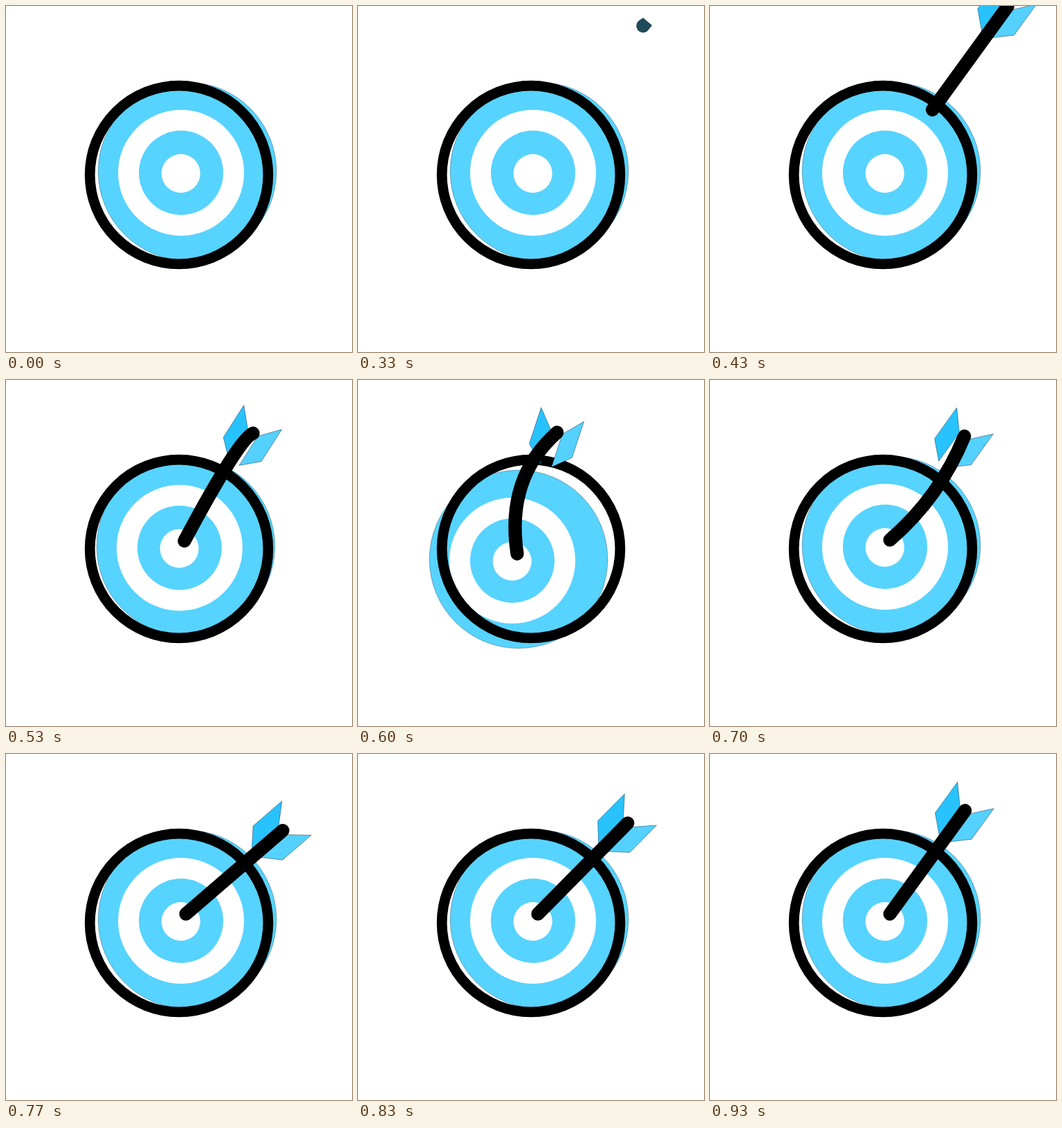
Animation of 500x500 px, one loop 1.31 s. Source, as an HTML page:

```html
<!DOCTYPE html>
<html lang="en">
<head>
<meta charset="utf-8">
<title>Target and arrow</title>
<style>
  html, body { margin: 0; width: 100%; height: 100%; overflow: hidden; background: #fff; }
  svg { display: block; width: 100%; height: 100%; }
</style>
</head>
<body>
<svg viewBox="0 0 500 500">
  <g id="disc">
    <circle cx="262" cy="239" r="128.8" fill="#57d3ff" stroke="#123" stroke-opacity=".5" stroke-width=".7"/>
    <circle cx="253" cy="241" r="91" fill="#fff"/>
    <circle cx="253" cy="241" r="61" fill="#57d3ff"/>
    <circle cx="252.7" cy="242" r="28" fill="#fff"/>
  </g>
  <circle cx="250" cy="244" r="128.8" fill="none" stroke="#000" stroke-width="14.8"/>
  <path id="bud" fill="#1f4a5c" d="M412 17L425 28L418 36.500A9.500 9.500 0 1 1 406 21Z"/>
  <g id="arrow">
    <g id="fletch" stroke="#123" stroke-opacity=".6" stroke-width=".7">
      <path fill="#28c3fe" d="M-33-27L-33 28L-9 51L-9 0Z"/>
      <path fill="#55d1ff" d="M32-27L32 28L8 50L8 0Z"/>
    </g>
    <path id="shaft" fill="none" stroke="#000" stroke-width="19.300" stroke-linecap="round"/>
  </g>
</svg>
<script>
const LOOP = 1310, STEP = 100 / 3, LENGTH = 184.6;
const LAUNCH = 333, IMPACT = 500;
const START = { x: 414, y: 28 }, HIT = { x: 260, y: 231.1 };

// Key poses as [time, value], eased in between
const ANGLE = [[507, 36], [600, 18.2], [790, 50.6], [900, 33.3], [933, 36]];
const PUSH = [[520, 0], [600, 1], [700, 0]];
const BEND = [[500, 0], [600, -50], [667, 30], [767, 0]];
const CREST = [[500, 1], [620, .5]];

const el = id => document.getElementById(id);
const disc = el('disc'), bud = el('bud'), arrow = el('arrow');
const fletch = el('fletch'), shaft = el('shaft');
const clamp = x => Math.max(0, Math.min(1, x));
const mix = (a, b, x) => a + (b - a) * x;
const smooth = x => x * x * (3 - 2 * x);
const show = (node, on) => node.setAttribute('visibility', on ? 'visible' : 'hidden');

function track(keys, t) {
  let value = keys[0][1];
  for (let i = 1; i < keys.length; i++) {
    const [t0, a] = keys[i - 1], [t1, b] = keys[i];
    if (t >= t0) value = mix(a, b, smooth(clamp((t - t0) / (t1 - t0))));
  }
  return value;
}

// Hold time to 30 steps a second, each starting on a whole 10 ms
function stepTime(t) {
  let k = Math.floor(t / STEP) + 1;
  while (Math.round(k * STEP / 10) * 10 > t) k--;
  return k * STEP;
}

function draw(now) {
  const t = stepTime(now);
  const flown = clamp((t - LAUNCH) / (IMPACT - LAUNCH));
  const size = Math.min(1, flown * 2);
  const push = track(PUSH, t), dx = -30 * push, dy = 20 * push;
  const x = mix(START.x, HIT.x, flown) + dx;
  const y = mix(START.y, HIT.y, flown) + dy;
  const len = LENGTH * size;

  show(bud, t > LAUNCH && flown < .1);
  show(arrow, flown >= .1);
  disc.setAttribute('transform', `translate(${dx} ${dy})`);
  arrow.setAttribute('transform', `translate(${x} ${y}) rotate(${track(ANGLE, t)})`);
  fletch.setAttribute('transform', `translate(0 ${-len}) scale(${size})`);
  shaft.setAttribute('d', `M0 0Q${track(BEND, t)} ${-len * track(CREST, t)} 0 ${-len}`);
}

function tick() {
  draw(performance.now() % LOOP);
  requestAnimationFrame(tick);
}
tick();
</script>
</body>
</html>
```
